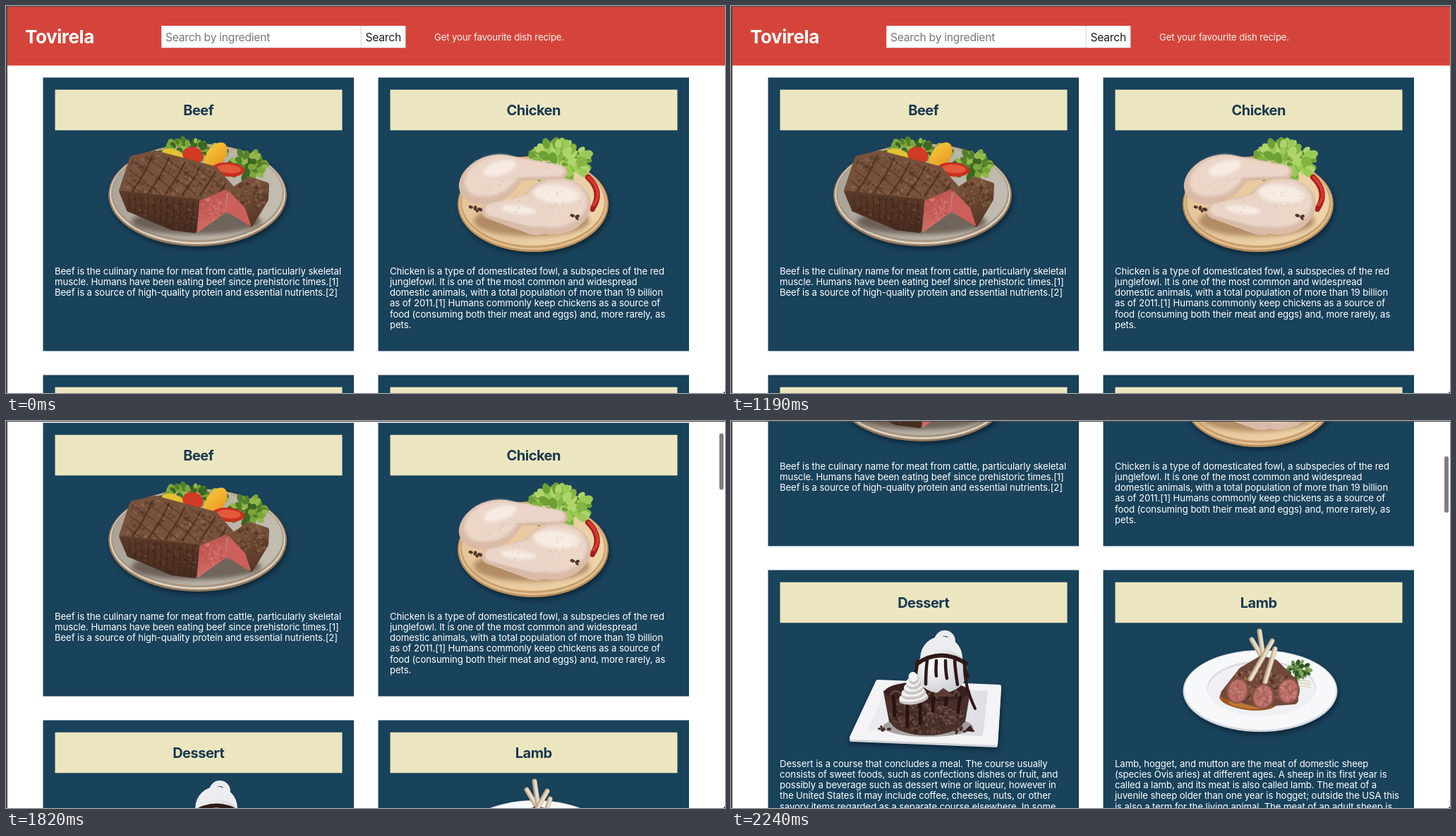
These frames come from a looping animation (1019x549 px, 2.31 s). An HTML page with a canvas:

```html
<!DOCTYPE html>
<html lang="en">
<head>
<meta charset="utf-8">
<title>Recipes</title>
<style>
  html, body { margin: 0; width: 100%; height: 100%; overflow: hidden; background: #fff; }
  #stage { position: relative; width: 1019px; height: 549px; overflow: hidden; background: #fff; }
  #page { position: absolute; left: 0; top: 0; width: 1019px; height: 900px; }
  #page canvas, #page svg { position: absolute; left: 0; top: 0; }
  text { font-family: Inter, "Open Sans", sans-serif; white-space: pre; }
  .brand { font-size: 26px; font-weight: 700; fill: #fff; letter-spacing: -.015em; }
  .field { font-size: 15.7px; letter-spacing: -.017em; fill: #777; }
  .button { fill: #1c1c1c; }
  .tag { font-size: 13.2px; letter-spacing: -.01em; fill: #fdf3f1; }
  .title { font-size: 20px; font-weight: 700; letter-spacing: -.025em; fill: #19384f; text-anchor: middle; }
  .body { font-size: 13.2px; letter-spacing: -.008em; fill: #fff; }
  #thumb { position: absolute; left: 1011px; top: 0; width: 6px; height: 80px; border-radius: 3px; background: rgba(0,0,0,.5); }
  .edge { position: absolute; left: 0; top: 0; background: #4b4849; }
  #corner { position: absolute; right: 0; bottom: 0; width: 3px; height: 3px; background: linear-gradient(135deg, transparent 55%, #444 60%); }
</style>
</head>
<body>
<div id="stage">
  <div id="page">
    <canvas id="art" width="1019" height="900"></canvas>
    <svg id="words" width="1019" height="900"></svg>
  </div>
  <div id="thumb"></div>
  <div class="edge" style="width:1019px;height:1.4px"></div>
  <div class="edge" style="width:1.5px;height:549px"></div>
  <div id="corner"></div>
</div>
<script>
const LOOP = 2310, STEP = 70, SCROLL_START = 1610;
const LEFT = 52.5, RIGHT = 527.5, ROW = 422;

const g = document.getElementById('art').getContext('2d');
let seed = 7;
const rnd = () => (seed = (seed * 16807) % 2147483647) / 2147483647;
const mix = (a, b, t) => a + (b - a) * t;

function rect(x, y, w, h, color) {
  g.fillStyle = color;
  g.fillRect(x, y, w, h);
}

function oval(x, y, rx, ry, color, turn = 0) {
  g.beginPath();
  g.ellipse(x, y, rx, ry, turn, 0, 7);
  g.fillStyle = color;
  g.fill();
}

// Polygon with corners rounded outwards by r.
function slab(color, r, ...points) {
  g.beginPath();
  points.forEach(p => g.lineTo(...p));
  g.closePath();
  g.fillStyle = g.strokeStyle = color;
  g.lineWidth = r * 2;
  g.lineJoin = 'round';
  g.fill();
  g.stroke();
}

function curve(color, width, from, bend, to) {
  g.beginPath();
  g.moveTo(...from);
  g.quadraticCurveTo(...bend, ...to);
  g.strokeStyle = color;
  g.lineWidth = width;
  g.lineCap = 'round';
  g.stroke();
}

// Tapered limb: a row of circles shrinking from one end to the other.
function limb(color, x0, y0, r0, x1, y1, r1) {
  for (let t = 0; t <= 1; t += .02) oval(mix(x0, x1, t), mix(y0, y1, t), mix(r0, r1, t), mix(r0, r1, t), color);
}

// Small random ovals spread over an ellipse.
function scatter(n, x, y, rx, ry, size, ...colors) {
  for (let i = 0; i < n; i++) {
    const a = rnd() * 7, d = Math.sqrt(rnd()), s = size * mix(.5, 1, rnd());
    oval(x + Math.cos(a) * d * rx, y + Math.sin(a) * d * ry, s * 1.5, s, colors[i % colors.length], a);
  }
}

function fade(x0, y0, x1, y1, a, b) {
  const f = g.createLinearGradient(x0, y0, x1, y1);
  f.addColorStop(0, a);
  f.addColorStop(1, b);
  return f;
}

function glow(x, y, r, a, b) {
  const f = g.createRadialGradient(x, y, 0, x, y, r);
  f.addColorStop(0, a);
  f.addColorStop(1, b);
  return f;
}

function soft(blur, draw) {
  g.save();
  g.filter = `blur(${blur}px)`;
  draw();
  g.restore();
}

function clipped(draw) {
  g.save();
  g.clip();
  draw();
  g.restore();
}

function plate(x, y, rx, ry, ...rings) {
  soft(3, () => oval(x + 2, y + 4, rx, ry, '#0c2739'));
  rings.forEach((c, i) => oval(x, y - i, rx - i * 2, ry - i * 2, c));
}

function drawBeef() {
  plate(271.5, 268, 126.5, 73, '#94795f', '#ddd2c1', '#a79681', fade(150, 230, 390, 300, '#aaa399', '#c4bdb2'));
  const greens = ['#547f2b', '#7ca53b', '#3c6622', '#91b94a'];
  scatter(90, 264, 208, 48, 18, 5, ...greens);
  scatter(60, 342, 226, 25, 19, 5, ...greens);
  oval(237, 212, 17, 9, '#e3c233', .3);
  oval(265, 212, 15, 12, '#d13a25', .3);
  oval(297, 213, 13, 22, fade(285, 200, 310, 230, '#f8c63c', '#e8921f'), .6);
  oval(315, 232, 23, 10, '#c92f21', .08);
  oval(316, 231, 17, 6, '#e2593b', .08);

  soft(3, () => oval(270, 306, 92, 18, 'rgba(60,48,38,.6)'));
  slab('#76513b', 5, [165, 262], [180, 217], [212, 210], [295, 232], [318, 258], [273, 274]);
  clipped(() => {
    scatter(260, 240, 240, 82, 36, 2.2, '#85604699', '#60412f99', '#94705699', '#54372799');
    for (let x = 150; x < 330; x += 25) {
      curve('#3d251999', 2.5, [x + 35, 205], [x + 25, 235], [x, 268]);
      curve('#3d251966', 2, [x - 30, 212], [x + 5, 235], [x + 45, 268]);
    }
  });
  slab(fade(200, 262, 200, 322, '#5b3b29', '#452a1e'), 3, [164, 265], [272, 277], [267, 319], [235, 315], [174, 289]);
  clipped(() => {
    scatter(150, 220, 290, 56, 32, 1.8, '#6b483488', '#3a231888');
    for (let x = 174; x < 272; x += 9) curve('#37201666', 2, [x, 264], [x + 3, 290], [x - 2, 318]);
  });
  slab(fade(275, 270, 300, 316, '#b9524c', '#d9706a'), 1, [275, 277], [312, 261], [311, 292], [272, 320]);
  slab(fade(330, 242, 350, 310, '#7c573f', '#573725'), 4, [319, 263], [345, 246], [369, 254], [368, 274], [347, 309]);
  scatter(80, 349, 267, 22, 20, 2, '#8b664a99', '#50342599');
  slab('#cc5f5a', 1, [315, 263], [338, 287], [346, 311], [313, 291]);
  scatter(60, 292, 288, 15, 17, 1.6, '#e0807a88', '#b94c4788');
}

function drawChicken() {
  plate(747, 281, 107, 68, '#b98e5d', '#e2bf8f', '#c9a06e', fade(645, 250, 850, 310, '#e6c498', '#eed4aa'));
  scatter(110, 780, 220, 48, 27, 6, '#83b540', '#9cca57', '#6ea035', '#b0d46c');
  curve('#a51f1c', 8, [825, 243], [847, 264], [831, 288]);
  curve('#d83a2d', 4, [826, 243], [847, 264], [833, 282]);
  soft(3, () => oval(745, 305, 82, 22, 'rgba(126,80,44,.5)'));

  const shade = '#d9bba8', skin = '#ebd6c8', light = '#f7ebe2';
  limb(shade, 705, 230, 19, 788, 236, 9);
  oval(687, 246, 47, 33, shade, -.4);
  soft(2, () => {
    oval(689, 241, 41, 27, skin, -.4);
    limb(skin, 705, 228, 14, 787, 234, 6);
    oval(700, 230, 24, 10, light, -.3);
  });
  limb(shade, 752, 295, 30, 683, 291, 10);
  oval(779, 284, 50, 40, shade, -.15);
  soft(2, () => {
    oval(779, 280, 45, 34, skin, -.15);
    limb(skin, 752, 290, 22, 684, 289, 6);
    oval(780, 267, 33, 13, light, .1);
    oval(726, 289, 25, 6, light, .1);
  });
  scatter(70, 740, 270, 75, 28, 1.4, '#f8ebe244', '#d3a99444');
  scatter(5, 665, 287, 7, 6, 2.5, '#53382b');
  scatter(4, 808, 300, 6, 10, 2.5, '#53382b');
}

function drawDessert() {
  const plateShape = [[208, 370], [380, 377], [375, 457], [171, 449]];
  soft(3, () => slab('#0c2739', 4, ...plateShape.map(([x, y]) => [x, y + 5])));
  slab('#cfd1d7', 3, ...plateShape.map(([x, y]) => [x, y + 3]));
  slab('#f4f4f6', 3, ...plateShape);
  slab(fade(210, 380, 350, 450, '#ecedf0', '#dcdee3'), 2, [222, 380], [362, 385], [355, 445], [196, 437]);

  oval(279, 434, 64, 14, '#41313166');
  const cake = '#49302b', sauce = '#2e1916';
  oval(278, 425, 52, 21, cake);
  slab(cake, 0, [218, 384], [337, 384], [330, 426], [226, 426]);
  scatter(240, 278, 416, 52, 28, 2, '#5e413a', '#39231f', '#6a4b42');
  oval(278, 384, 60, 15, '#38211e');
  for (let i = 0; i < 6; i++) {
    curve('#654740', 2.5, [226 + i * 18, 388], [236 + i * 17, 376], [244 + i * 16, 393]);
    curve('#271311', 5, [230 + i * 19, 392], [232 + i * 18, 405], [232 + i * 18, 418 + 16 * Math.sin(i * 1.2)]);
  }

  g.beginPath();
  g.arc(303, 312, 11, 0, 7);
  g.strokeStyle = '#eaebee';
  g.lineWidth = 8;
  g.stroke();
  limb('#ecedf0', 301, 322, 15, 298, 336, 30);
  oval(298, 355, 37, 31, glow(288, 345, 52, '#fff', '#c4c7cd'));
  curve(sauce, 6, [264, 344], [298, 321], [333, 344]);
  for (let i = 0; i < 6; i++) {
    const x = 265 + i * 13;
    curve(sauce, 4.5, [x, 340], [x + i - 3, 355], [x + i * 2 - 4, 367 + 7 * Math.sin(i * 2)]);
  }
  curve(sauce, 4, [331, 345], [330, 375], [346, 408]);

  for (let i = 0; i < 5; i++) {
    oval(259, 394 - i * 7, 21 - i * 3.4, 8, '#cbc4c4', -.15);
    oval(258, 391 - i * 7, 20 - i * 3.4, 7, '#f4f1f1', -.15);
  }
  slab('#5b3b34', 1, [288, 390], [301, 380], [315, 390]);
  slab('#3a211e', 1, [333, 439], [339, 433], [344, 440]);
  scatter(5, 217, 437, 8, 4, 2.5, '#4a2f2a');
  scatter(5, 322, 440, 9, 4, 2.5, '#4a2f2a');
}

function drawLamb() {
  plate(750, 383, 109.5, 58, '#d4d8de', '#f7f8f9');
  oval(752, 379, 77, 39, '#d9dce1');
  oval(752, 381, 76, 38, '#eff0f3');
  oval(733, 396, 41, 14, '#9b5724', .12);
  oval(733, 402, 28, 6, '#bd7732', .1);
  scatter(45, 803, 354, 17, 14, 3, '#3c6b30', '#638f45', '#2d5528', '#81a75a');
  for (let y = 370; y < 380; y += 4) curve('#d7dcc6', 2, [793, y + 3], [808, y - 5], [821, y]);

  const bone = (x0, y0, x1, y1) => {
    curve('#bda98e', 7, [x0, y0], [x0, y0], [x1, y1]);
    curve('#e8dcc8', 4, [x0 + 1, y0], [x0 + 1, y0], [x1 + 1, y1]);
  };
  bone(738, 310, 760, 347);
  bone(749, 298, 755, 339);
  slab('#70483a', 6, [700, 387], [725, 355], [752, 339], [770, 344], [798, 372], [798, 396], [745, 400]);
  scatter(150, 750, 376, 42, 26, 2.2, '#865c49', '#553529', '#93664f');
  for (let i = 0; i < 3; i++) {
    const x = 718 + i * 36, y = 383 + 8 * (i === 1);
    oval(x, y, 16, 18, '#8a5247', .2);
    oval(x, y, 13, 16, '#b96f68', .2);
    scatter(30, x, y, 12, 14, 2, '#cf8b8099', '#9c565199');
  }
  bone(767, 312, 736, 366);
  bone(771, 323, 757, 370);
}

const cards = [
  [LEFT, 0, 'Beef', [
    'Beef is the culinary name for meat from cattle, particularly skeletal',
    'muscle. Humans have been eating beef since prehistoric times.[1]',
    'Beef is a source of high-quality protein and essential nutrients.[2]']],
  [RIGHT, 0, 'Chicken', [
    'Chicken is a type of domesticated fowl, a subspecies of the red',
    'junglefowl. It is one of the most common and widespread',
    'domestic animals, with a total population of more than 19 billion',
    'as of 2011.[1] Humans commonly keep chickens as a source of',
    'food (consuming both their meat and eggs) and, more rarely, as',
    'pets.']],
  [LEFT, ROW, 'Dessert', [
    'Dessert is a course that concludes a meal. The course usually',
    'consists of sweet foods, such as confections dishes or fruit, and',
    'possibly a beverage such as dessert wine or liqueur, however in',
    'the United States it may include coffee, cheeses, nuts, or other',
    'savory items regarded as a separate course elsewhere. In some']],
  [RIGHT, ROW, 'Lamb', [
    'Lamb, hogget, and mutton are the meat of domestic sheep',
    '(species Ovis aries) at different ages. A sheep in its first year is',
    'called a lamb, and its meat is also called lamb. The meat of a',
    'juvenile sheep older than one year is hogget; outside the USA this',
    'is also a term for the living animal. The meat of an adult sheep is']]
];

const words = [];
const write = (cls, x, y, s) => words.push(`<text class="${cls}" x="${x}" y="${y}">${s}</text>`);

rect(0, 0, 1019, 84.5, '#d5443a');
rect(220, 28, 346.5, 31.5, '#c9c4c2');
rect(220.7, 28.5, 282, 30.5, '#fff');
rect(503.5, 28.5, 62.5, 30.5, '#fff');
write('brand', 27, 53, 'Tovirela');
write('field', 226, 50, 'Search by ingredient');
write('field button', 509.5, 50, 'Search');
write('tag', 607, 48.5, 'Get your favourite dish recipe.');

for (const [x, y, title, lines] of cards) {
  rect(x, 101.5 + y, 440.5, 388, '#19425b');
  rect(x + 17, 118.7 + y, 407, 57.6, '#ece6c0');
  write('title', x + 220.2, 155 + y, title);
  lines.forEach((s, i) => write('body', x + 16.5, 380.7 + y + i * 15.25, s));
}
document.getElementById('words').innerHTML = words.join('');

drawBeef();
drawChicken();
g.translate(0, 312);
drawDessert();
drawLamb();

const page = document.getElementById('page');
const thumb = document.getElementById('thumb');

// A flick: quick start, then a long glide towards rest.
const glide = t => 335.5 * (1 - Math.exp(-((t / 370) ** 1.85)));

function tick() {
  const now = performance.now() % LOOP;
  const t = Math.max(0, now - now % STEP - SCROLL_START);
  const y = Math.round(glide(t));
  page.style.transform = `translateY(${-y}px)`;
  thumb.style.visibility = t > 0 ? 'visible' : 'hidden';
  thumb.style.transform = `translateY(${2.5 + y * .152}px)`;
  requestAnimationFrame(tick);
}
tick();
</script>
</body>
</html>
```
